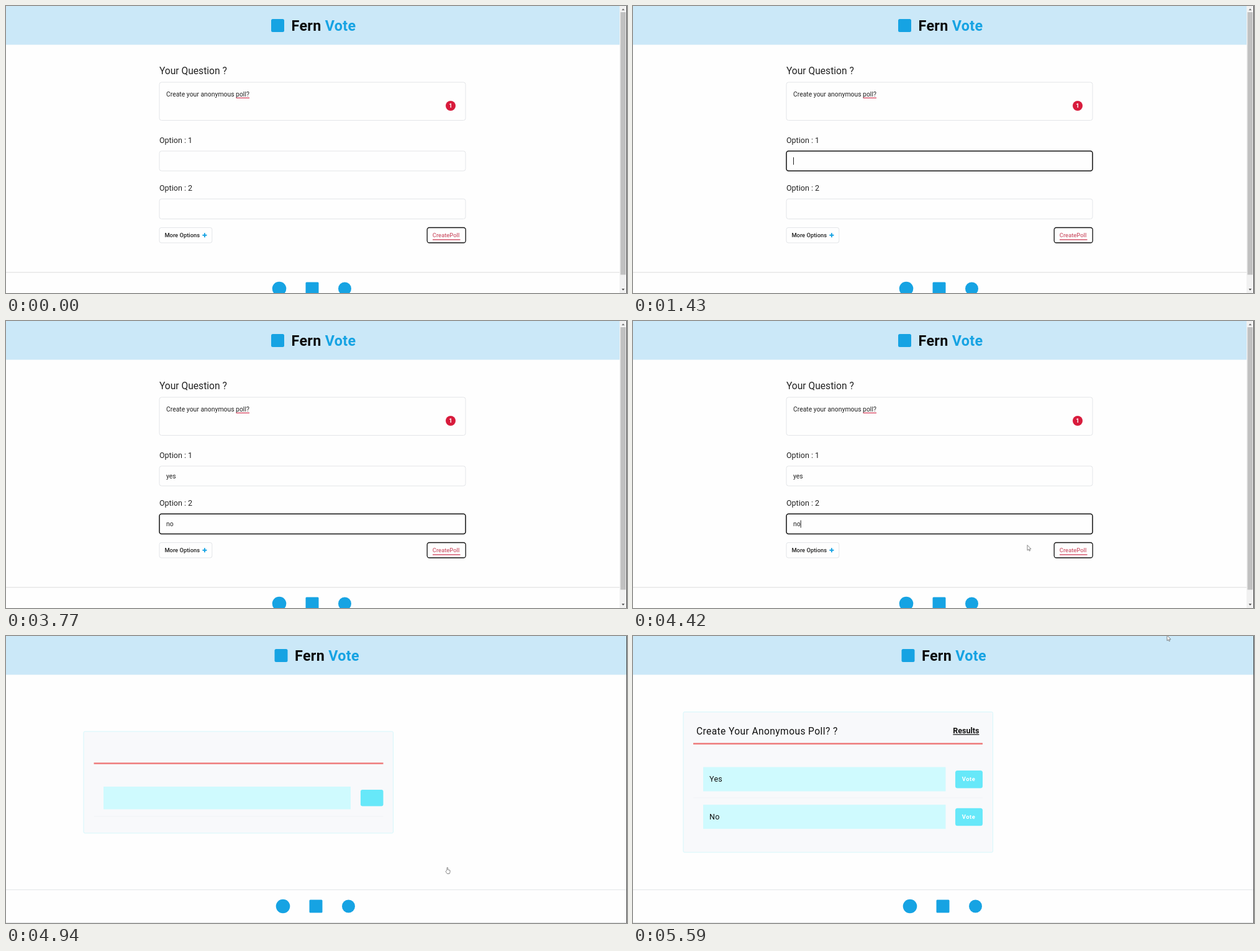
Animation, 1000 px wide and 463 px high, one loop 6.11 s. Source, as an HTML page:

```html
<!DOCTYPE html>
<html lang="en">
<head>
<meta charset="utf-8">
<title>Poll demo</title>
<style>
  html, body { margin: 0; width: 100%; height: 100%; overflow: hidden; background: #fefefe; }
  svg { display: block; width: 1000px; height: 463px; font: 10.4px Roboto, sans-serif; fill: #222; }
  .brand { fill: #16a3e3; }
  .title { font-size: 23.4px; font-weight: 700; letter-spacing: .3px; fill: #0b0b0b; }
  .question { font-size: 15.6px; }
  .label { font-size: 12.5px; }
  .small { font-size: 9.375px; font-weight: 500; }
  .field { fill: #fefefe; stroke: #e3e5e8; }
  .field.focus { stroke: #111; stroke-width: 1.5; }
  #create rect { fill: #fefefe; stroke: #111; stroke-width: 1.3; }
  #create text { fill: #cf5d70; }
  #create path { stroke: #d4566c; stroke-width: 1.6; }
  #create.hover rect { stroke: #8b2438; }
  #create.hover text { fill: #222; }
  #create.hover path { stroke: #5a1020; }
  .card { fill: #f8f9fb; stroke: #d5f7fb; }
  .rule { stroke: #ee7a7a; stroke-width: 2.5; }
  .divider { stroke: #f1f3f6; }
  .answer { fill: #cffafe; }
  .vote { fill: #67e8f9; }
  .wide { letter-spacing: .025em; fill: #111; }
  .vote-text { font-size: 9.4px; font-weight: 700; letter-spacing: .5px; fill: #fff; }
  #mouse path { fill: #fff; stroke: #555; stroke-width: .7; }
</style>
</head>
<body>
<svg viewBox="0 0 1000 463">
  <defs>
    <g id="heading">
      <rect class="brand" x="427" y="21" width="21" height="21" rx="2.5"/>
      <text class="title" x="459.5" y="40">Fern <tspan class="brand">Vote</tspan></text>
    </g>
    <g id="social" class="brand">
      <circle cx="446" cy="436" r="11.3"/>
      <rect x="488.5" y="425.5" width="21" height="21" rx="1.5"/>
      <circle cx="551.5" cy="436" r="10.5"/>
    </g>
  </defs>
  <rect width="1000" height="62.5" fill="#cbe8f8"/>

  <g id="form">
    <use href="#heading"/>
    <text class="question" x="247" y="109.5">Your Question ?</text>
    <rect class="field" x="247" y="123" width="493" height="61.5" rx="3.5"/>
    <text x="258" y="145.5">Create your anonymous poll?</text>
    <path d="M370.5 148.3H392" stroke="#d3304e" stroke-width="1.2"/>
    <circle cx="716" cy="161" r="8" fill="#d81b3c"/>
    <text x="716" y="164.4" font-size="9.4" font-weight="700" text-anchor="middle" fill="#fff">1</text>

    <text class="label" x="247" y="221">Option : 1</text>
    <rect class="field" x="247" y="234" width="493" height="32" rx="3.5"/>
    <text id="first" x="258" y="253.6"></text>
    <text class="label" x="247" y="298.3">Option : 2</text>
    <rect class="field" x="247" y="311.2" width="493" height="32.3" rx="3.5"/>
    <text id="second" x="258" y="331"></text>
    <path id="caret" stroke="#222"/>

    <rect class="field" x="247" y="357.5" width="84.8" height="24.5" rx="3"/>
    <text class="small" x="255.4" y="373">More Options</text>
    <path d="M316.4 369.8h7M319.9 366.3v7" stroke="#16a3e3" stroke-width="1.9"/>
    <g id="create">
      <rect x="678.2" y="357.5" width="62" height="24.5" rx="3.5"/>
      <text class="small" x="686.8" y="373">CreatePoll</text>
      <path d="M687 377H731.5"/>
    </g>

    <path d="M0 429.8H988" stroke="#dcdcdc"/>
    <use href="#social" x="-6" y="20"/>
    <rect x="988" width="11" height="463" fill="#f1f1f1"/>
    <rect x="989.5" y="10" width="8.5" height="423.5" fill="#c1c1c1"/>
    <path d="M991.5 7l2.3-3 2.3 3z" fill="#777"/>
    <path d="M991.5 456l2.3 3 2.3-3z" fill="#555"/>
  </g>

  <g id="result">
    <use href="#heading" x="5.5"/>
    <g id="loading">
      <rect class="card" x="125" y="154" width="498.5" height="164" rx="2"/>
      <path class="rule" d="M141.5 205.5H607.5"/>
      <path class="divider" d="M141.5 291H607.5"/>
      <rect class="answer" x="157" y="243" width="398" height="36.5"/>
      <rect class="vote" x="571" y="248" width="36.5" height="26.5" rx="3"/>
    </g>
    <g id="loaded">
      <rect class="card" x="81" y="122.5" width="498.5" height="226.5" rx="2"/>
      <text class="question wide" x="102" y="158.5">Create Your Anonymous Poll? ?</text>
      <text class="label" x="515.3" y="157.3" font-weight="700" fill="#111" text-decoration="underline">Results</text>
      <path class="rule" d="M97 173.8H563"/>
      <path class="divider" d="M97 261H563"/>
      <g id="answer">
        <rect class="answer" x="113" y="211.5" width="390.5" height="39"/>
        <rect class="vote" x="519" y="217" width="44" height="28.5" rx="3.5"/>
        <text class="vote-text" x="529.8" y="234.3">Vote</text>
      </g>
      <use href="#answer" y="60.7"/>
      <text class="label wide" x="123" y="235.4">Yes</text>
      <text class="label wide" x="123" y="296.1">No</text>
    </g>
    <path d="M0 409.3H999M0 462.5H999" stroke="#e2e4e6"/>
    <use href="#social"/>
  </g>

  <path d="M999.5 0V463" stroke="#444"/>
  <g id="mouse">
    <path id="arrow" d="M0 0V8.6L2 6.8 3.3 9.6 4.6 9 3.4 6.3H6Z"/>
    <path id="hand" d="M0 5V1.2a.8.8 0 0 1 1.6 0V4L5 5V8L4 10.5H.5L-2 7-1.2 5.8Z"/>
  </g>
</svg>
<script>
const LOOP = 6110, STEP = 130;
const $ = id => document.getElementById(id);
const fields = [...document.querySelectorAll(".field")];
const inputs = [fields[0].nextElementSibling, $("first"), $("second")];

// [time, x, y] of the pointer tip
const moves = [
  [[910, 378, 163], [1040, 362, 219], [1300, 340, 248]],
  [[4030, 420, 322], [4290, 560, 350], [4550, 710, 373], [5070, 710, 373],
   [5330, 755, 245], [5460, 825, 85], [5590, 860, -1], [LOOP, 860, -1]]
];

const show = (id, on) => { $(id).style.display = on ? "" : "none"; };
const typed = (t, word, times) => word.slice(0, times.filter(at => t >= at).length);

function pointerAt(t) {
  const path = moves.find(p => t >= p[0][0] && t <= p.at(-1)[0]);
  if (!path) return null;
  const i = Math.max(1, path.findIndex(p => p[0] >= t));
  const [t0, x0, y0] = path[i - 1], [t1, x1, y1] = path[i];
  const k = (t - t0) / (t1 - t0);
  return [x0 + (x1 - x0) * k, y0 + (y1 - y0) * k];
}

function focusAt(t) {
  if (t < 650 || t >= 4680) return -1;
  return t < 1300 ? 0 : t < 2860 ? 1 : 2;
}

function draw(t) {
  const submitted = t >= 4940;
  show("form", !submitted);
  show("result", submitted);
  show("loading", t < 5070);
  show("loaded", t >= 5070);

  inputs[1].textContent = typed(t, "yes", [2080, 2210, 2470]);
  inputs[2].textContent = typed(t, "no", [3120, 3250]);
  const focus = focusAt(t);
  fields.forEach((field, i) => field.classList.toggle("focus", i === focus));
  const caretOn = focus >= 0 && (t < 3770 || t >= 4290);
  show("caret", caretOn);
  if (caretOn && !submitted) {
    const input = inputs[focus];
    const x = 258.5 + input.getComputedTextLength();
    $("caret").setAttribute("d", `M${x} ${input.getAttribute("y") - 9.5}v12`);
  }
  $("create").classList.toggle("hover", t >= 4680);

  const pointer = pointerAt(t);
  show("mouse", pointer);
  if (pointer) $("mouse").setAttribute("transform", `translate(${pointer})`);
  const overButton = t >= 4550 && t < 5070;
  show("hand", overButton);
  show("arrow", !overButton);
}

const start = performance.now();
function tick() {
  const t = (performance.now() - start) % LOOP;
  draw(Math.floor(t / STEP) * STEP);
  requestAnimationFrame(tick);
}
tick();
</script>
</body>
</html>
```
